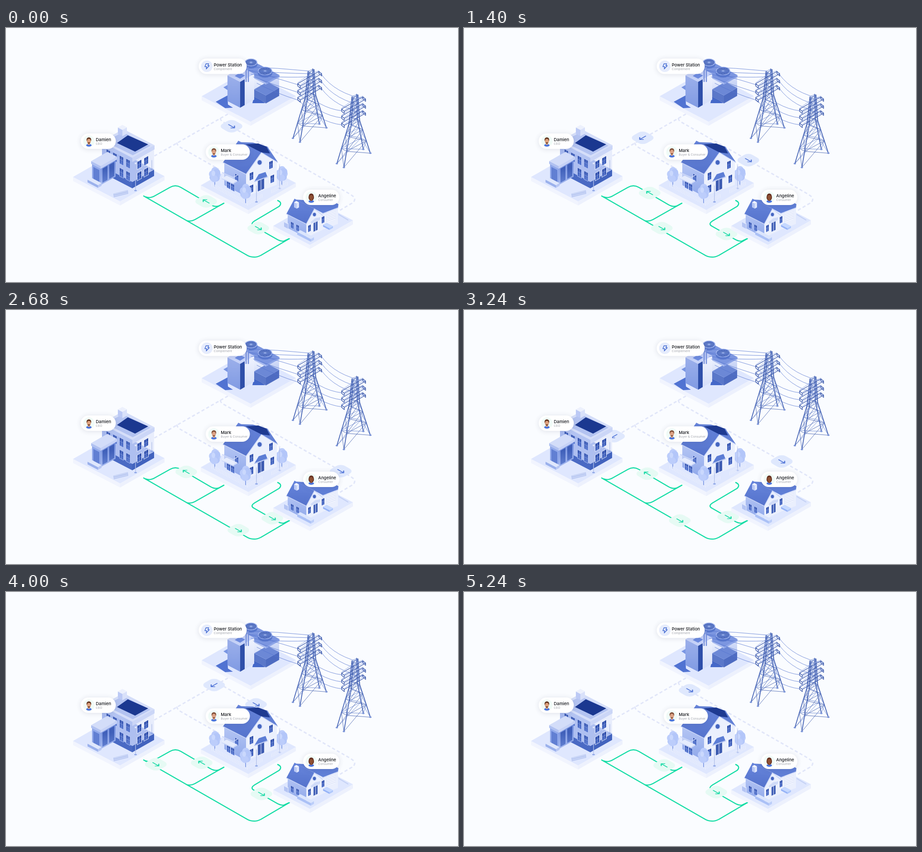
These frames come from a looping animation (998 by 561 pixels, 5320 ms). An HTML page with a canvas:

```html
<!DOCTYPE html>
<html lang="en">
<head>
<meta charset="utf-8">
<title>Local energy sharing</title>
<style>
html, body { margin: 0; width: 100%; height: 100%; overflow: hidden; background: #fafcff; }
canvas { display: block; width: 998px; height: 561px; }
</style>
</head>
<body>
<canvas id="stage" width="998" height="561"></canvas>
<script>
const W = 998, H = 561, LOOP = 5320, HALF = 2680;
const KL = .52, KR = -.57;   // slopes of left and right facing edges
const FONT = 'Inter, "Open Sans", sans-serif';
const stage = document.getElementById('stage').getContext('2d');
let c;

function layer(draw) {
  const cv = document.createElement('canvas');
  cv.width = W; cv.height = H;
  c = cv.getContext('2d');
  c.lineCap = c.lineJoin = 'round';
  draw();
  return cv;
}
function poly(pts, fill) {
  c.fillStyle = fill;
  c.fill(new Path2D('M' + pts.replace(/ /g, 'L') + 'Z'));
}
function path(d, color, width) {
  c.strokeStyle = color; c.lineWidth = width;
  c.stroke(new Path2D(d));
}
function oval(x, y, rx, ry, fill) {
  c.fillStyle = fill;
  c.beginPath(); c.ellipse(x, y, rx, ry, 0, 0, 7); c.fill();
}
function fade(y, h, a, b) {
  const g = c.createLinearGradient(0, y, 0, y + h);
  g.addColorStop(0, a); g.addColorStop(1, b);
  return g;
}
// Upright parallelogram: (x, y) is its top left corner, k its slope
function wall(x, y, w, h, k, fill) {
  poly(`${x},${y} ${x + w},${y + w * k} ${x + w},${y + w * k + h} ${x},${y + h}`, fill);
}
// Block standing on its front corner (x, y), a wide to the left, b to the right
function box(x, y, a, b, h, top, left, right) {
  const t = y - h;
  wall(x - a, t - a * KL, a, h, KL, left);
  wall(x, t, b, h, KR, right);
  poly(`${x},${t} ${x + b},${t + b * KR} ${x + b - a},${t + b * KR - a * KL} ${x - a},${t - a * KL}`, top);
}
const slab = (x, y, a, b) => box(x, y + 9, a, b, 9, '#dfe7fe', '#f1f4fe', '#edf1fd');

function win(x, y, w, h, k) {
  wall(x - .8, y - .8 - k * .8, w + 1.6, h + 1.6, k, k < 0 ? '#fff' : '#bac9f5');
  wall(x, y, w, h, k, fade(y, h, '#2f4eaa', '#4f70cb'));
  path(`M${x + w / 2} ${y + w * k / 2}v${h}M${x} ${y + h * .45}l${w} ${w * k}`, '#9db3ec', .6);
}

/* ---------- lines on the ground ---------- */
function ground() {
  c.fillStyle = '#fafcff';
  c.fillRect(0, 0, W, H);
  c.lineCap = 'butt';
  c.setLineDash([7, 5]);
  const pale = '#e1e6f9', green = '#14dda6';
  path('M490 190L320 287', pale, 3);
  path('M473 199Q474 205 480 208L758 366Q770 373 770 378Q770 384 762 388L735 404', pale, 3);
  path('M377 253Q378 259 384 263L470 312', pale, 3);
  c.setLineDash([]);
  c.lineCap = 'round';
  path('M304 371L529 500Q546 511 563 502L626 465', green, 2.5);
  path('M308 373Q317 377 328 371L362 352Q374 345 386 352L451 390Q461 396 470 393L481 387', green, 2.5);
  path('M481 387L421 421Q410 428 400 426', green, 2.5);
  path('M600 381Q611 386 603 394L549 426Q538 433 548 438L597 466Q605 471 613 471L626 465', green, 2.5);
}

/* ---------- power station and pylons ---------- */
function fan(x, y, rx, ry) {
  oval(x, y + 5, rx, ry, '#5877cc');
  c.fillRect(x - rx, y, rx * 2, 5);
  oval(x, y, rx, ry, '#a3b7ef');
  oval(x, y, rx - 2, ry - 1.5, '#506dbe');
  for (let a = 0; a < 6.2; a += Math.PI / 6)
    path(`M${x} ${y}l${Math.cos(a) * (rx - 3)} ${Math.sin(a) * (ry - 2.5)}`, '#7f97d8', .6);
  oval(x, y, 3, 2, '#91a8e4');
}
function station() {
  slab(540, 207, 108, 100);
  poly('463,163 489,149 490,169 501,176 484,177', '#5173d2');
  poly('480,131 489,126 489,137', '#7a96e3');
  poly('544,166 548,150 572,166', '#4468c9');
  box(574, 166, 26, 29, 44, '#9db2ec', fade(110, 50, '#eef2fd', '#c3d0f6'), fade(105, 50, '#dbe3fa', '#a6b9ee'));
  box(574, 166, 26, 29, 17, '#6c88d6', '#6683d2', '#5573c8');
  for (let y = 151; y < 167; y += 3) path(`M548 ${y - 26 * KL}L574 ${y}L603 ${y + 29 * KR}`, '#3b59b0', .8);
  box(574, 125, 65, 30, 4, '#7c96e0', '#a9bbef', '#8fa6e8');
  fan(541, 76, 14, 8.5);
  fan(572, 95, 16, 9.5);
  box(517, 176, 28, 31, 57, '#c6d2f8', fade(104, 70, '#9cb0eb', '#819be3'), fade(100, 70, '#f1f4fe', '#d5def9'));
  wall(517, 119, 10, 57, KR, '#2f4fa9');
  poly('505,106 516,99 528,105 517,112', '#6d8be0');
  for (const x of [530, 535]) {
    path(`M${x} 86v32`, '#6482d6', 2.6);
    path(`M${x - .8} 86v32`, '#b6c5f2', .8);
  }
}
function pylon() {
  const dark = '#3856a9', mid = '#6380cc', lite = '#91a8e2';
  // corners of the mast at height k (0 ground, 1 waist, 2 top)
  const ring = k => {
    const s = k < 1 ? 1 - k * .68 : .32 - (k - 1) * .14;
    const x = 670.5 + k * 1.5, y = k < 1 ? 232 - k * 80 : 152 - (k - 1) * 58;
    return [[-1, .31], [-.58, .54], [1, -.31], [.58, -.54]].map(p => [x + p[0] * 37 * s, y + p[1] * 37 * s]);
  };
  const bands = [0, .38, .72, 1, 1.27, 1.52, 1.77, 2].map(ring);
  bands.slice(1).forEach((hi, n) => {
    const lo = bands[n];
    for (let i = 0; i < 4; i++) {
      const j = (i + 1) % 4;
      path(`M${lo[i]}L${hi[j]}M${lo[j]}L${hi[i]}L${hi[j]}`, i < 2 ? dark : mid, .8);
      path(`M${lo[i]}L${hi[i]}`, dark, 1.8);
      path(`M${lo[i][0] - .6} ${lo[i][1]}L${hi[i][0] - .6} ${hi[i][1]}`, lite, .6);
    }
  });
  for (const f of bands[0]) oval(f[0], f[1], 2.8, 1.8, '#7c95d9');
  for (let y = 0; y < 32; y += 15.5) {
    path(`M644 ${123 + y}l47 -27l6 5l-47 27zv5l6 5v-5M691 ${96 + y}v5l6 5v-5`, dark, 1.3);
    path(`M644 ${121 + y}l24 -17l23 -10M650 ${126 + y}l24 -18l23 -9`, lite, .9);
  }
}
function wires() {
  const blue = '#5675d0';
  for (let i = 0; i < 3; i++) {
    const y = i * 15.5;
    path(`M${533 + i * 4} ${86 + i * 8}Q600 ${88 + i * 12} ${669 + i * 8} ${95 + i * 6}`, blue, .8);
    path(`M${538 + i * 8} ${94 + i * 14}Q595 ${110 + i * 17} 647 ${126 + i * 17}`, blue, .8);
    path(`M696 ${102 + y}Q727 ${145 + y} 793 ${157 + y}M648 ${130 + y}Q690 ${177 + y} 742 ${183 + y}`, blue, .8);
  }
}

/* ---------- houses ---------- */
function lamp(x, y0, y1) {
  path(`M${x} ${y0}V${y1}`, '#b3c1ea', 1.4);
  oval(x, y0, 2, 2, '#e5ebfc');
  oval(x, y1, 3, 1.6, '#8ea6e6');
}
function office() {
  slab(252, 383, 104, 98);
  box(279, 354, 67, 48, 65, '#aebff0', fade(255, 95, '#b0c1f2', '#819be5'), '#e8edfc');
  box(279, 354, 67, 48, 14, '#aebff0', '#4a6ac4', '#4263be');
  box(279, 296, 69, 49, 9, '#d5def9', '#b4c4f2', '#cbd6f7');
  poly('219,251 258,230 319,260 280,281', '#b3c3f1');
  poly('245,254 269,237 314,257 285,273', '#1b3890');
  box(257, 239, 10, 10, 14, '#edf1fd', '#bccaf5', '#d9e1fa');
  for (let i = 0; i < 4; i++) {
    win(222 + i * 14.5, 268 + i * 7, 8, 17, KL);
    if (i > 1) win(222 + i * 14.5, 295 + i * 7, 8, 18, KL);
    win(290 + i % 2 * 15, 296 - i % 2 * 8 + (i > 1 ? 25 : 0), 9, 16, KR);
  }
  // porch
  box(209, 347, 19, 33, 40, '#c0cef5', '#90a8ea', fade(290, 55, '#6d8adb', '#a3b7ee'));
  wall(193, 307, 13, 28, KL, '#617fd3');
  for (const x of [213, 228]) wall(x, 313 - (x - 209) * .57, 11, 31, KR, fade(310, 34, '#3f5fb9', '#6381d2'));
  box(209, 311, 21, 36, 6, '#d3ddf9', '#b0c1f1', '#c6d2f6');
  // street furniture
  box(203, 353, 23, 8, 6, '#dfe7fc', '#9bb1ec', '#b9c8f4');
  poly('237,366 269,358 270,366 238,374', '#b9c8f2');
  path('M239 367L268 360M239 371L268 364', '#dbe3fa', 1);
  lamp(286, 299, 359);
  lamp(322, 290, 312);
}
function tree(x, y) {
  path(`M${x} ${y}v24`, '#8ba4e8', 2);
  for (let i = 0; i < 7; i++) {
    const a = i * 2.4;
    oval(x + Math.cos(a) * 5, y - 1 + Math.sin(a) * 9, 8, 8, i % 2 ? '#b3c6f9' : '#bccdfb');
  }
  oval(x - 3, y - 4, 4, 6, '#cad8fd');
}
function fence(x0, y0, x1, y1) {
  const dx = x1 - x0, dy = y1 - y0, n = Math.round(dx / 3.2);
  path(`M${x0} ${y0 - 2}l${dx} ${dy}M${x0} ${y0 - 5}l${dx} ${dy}`, '#d0daf8', .8);
  for (let i = 0; i <= n; i++) path(`M${x0 + dx * i / n} ${y0 + dy * i / n}v-7`, '#eef2fe', 1.2);
}
// House with a gable on its right side, front corner at (x, y)
function gabled(x, y, a, b, h, k, rise) {
  const e = y - h, ax = x + b / 2, ay = e + b / 2 * k - rise;
  wall(x - a, e - a * KL, a, h, KL, fade(e - 20, h + 20, '#b3c4f3', '#8ea7ea'));
  poly(`${x},${y} ${x},${e} ${ax},${ay} ${x + b},${e + b * k} ${x + b},${y + b * k}`, '#ebf0fd');
  poly(`${ax},${ay} ${x},${e + 1} ${x - a - 3},${e - a * KL} ${ax - a - 3},${ay - a * KL - 1}`,
    fade(ay - a * KL, e - ay + a * KL, '#6684db', '#5573cc'));
  path(`M${x - a - 3} ${e - a * KL}L${x} ${e + 1}L${ax} ${ay}L${x + b + 2} ${e + b * k + 1}`, '#cad6f8', 1.5);
}
function roundWindow(x, y, r) {
  oval(x, y, r + 1.5, r + 1.7, '#c9d5f7');
  oval(x, y, r, r + .4, '#4566c1');
}
function villa() {
  slab(535, 402, 105, 105);
  tree(461, 325);
  tree(609, 323);
  poly('512,252 545,253 577,262 600,296 564,277', '#6381d5');
  poly('529,257 557,255 575,262 583,277 564,275', '#1e3a91');
  gabled(530, 372, 48, 68, 50, -.38, 34);
  roundWindow(560, 297, 4.5);
  for (const [x, y] of [[538, 321], [581, 296], [538, 349], [584, 327]]) win(x, y, 8, 16, -.45);
  wall(556, 338, 14, 23, -.45, '#3f5db2');
  path('M563 335v23', '#d7e0f9', 1.2);
  poly('549,338 558,323 573,318 577,328', '#5c7dd5');
  path('M549 339L577 329', '#b6c6f2', 2);
  for (let i = 0; i < 3; i++) win(488 + i * 9, 338 + i * 5 - (i > 1 ? 26 : 0), 7, 14, KL);
  // balcony
  poly('477,332 487,326 511,337 501,343', '#e2e9fc');
  for (let i = 0; i < 9; i++) path(`M${478 + i * 3} ${319 + i * 1.3}v13`, '#eef2fe', 1);
  path('M477 319L501 330L511 325M477 333L501 344L511 338', '#cdd8f8', 1.5);
  lamp(604, 302, 354);
  fence(587, 364, 621, 347);
  fence(455, 350, 533, 391);
  fence(533, 391, 565, 374);
  tree(529, 362);
  lamp(553, 346, 384);
}
function cottage() {
  slab(671, 479, 81, 95);
  wall(698, 404, 35, 42, -.38, '#eaeffd');
  poly('640,379 724,384 734,389 733,397 700,409 683,400', '#5f7ed6');
  gabled(663, 463, 41, 36, 31, -.48, 24);
  path('M699 410L733 397', '#c4d1f7', 1.4);
  box(642, 399, 6, 5, 11, '#f0f4ff', '#bac8f4', '#dde5fb');
  roundWindow(681, 412, 3.3);
  win(629, 428, 6, 13, KL);
  win(641, 434, 6, 13, KL);
  win(667, 437, 6, 14, -.48);
  win(697, 418, 6, 14, -.45);
  wall(679, 431, 9, 19, -.48, '#4462b7');
  path('M683.5 429v19', '#d4def9', 1);
  poly('673,428 683,420 694,418 693,424 674,432', '#d0dbf8');
  wall(708, 407, 19, 22, -.38, '#f7f9ff');
  for (let y = 409; y < 428; y += 3.6) path(`M708 ${y}l19 -7.2`, '#c2cff4', .9);
  // hedges, pool and low walls
  box(673, 472, 30, 7, 6, '#dbe5fd', '#abc1f6', '#bccef9');
  box(714, 446, 14, 8, 4, '#c5d8ff', '#97b4f7', '#aec7fb');
  box(622, 443, 8, 2, 10, '#dfe7fc', '#b4c4f3', '#c9d5f7');
  path('M735 412L755 424', '#c5d2f5', 2.2);
}

/* ---------- labels ---------- */
function label(x, y, w, title, sub) {
  c.save();
  c.shadowColor = 'rgba(50,60,95,.14)';
  c.shadowBlur = 12; c.shadowOffsetY = 1;
  c.fillStyle = '#fff';
  c.beginPath(); c.roundRect(x, y, w, 34, 17); c.fill();
  c.restore();
  c.fillStyle = '#15171c';
  c.font = '500 9.4px ' + FONT;
  c.fillText(title, x + 33.3, y + 17);
  c.fillStyle = '#a2a5ad';
  c.font = '400 6.7px ' + FONT;
  c.fillText(sub, x + 33.3, y + 25.3);
}
function avatar(x, y, skin, hair, long) {
  oval(x, y, 12.7, 12.7, '#f0fbf7');
  if (long) oval(x, y, 6, 7.5, hair);
  oval(x, y + 9, 6, 3, '#4b74dc');
  c.fillStyle = skin; c.fillRect(x - 2, y + 3, 4, 5);
  oval(x, y - 3, 5.2, 5.6, hair);
  oval(x, y, 4.4, 5.2, skin);
  if (!long) oval(x, y + 4, 2.8, 1.3, hair);
}
function labels() {
  label(425.5, 67.5, 106, 'Power Station', 'Complement');
  oval(443.5, 84.5, 12.7, 12.7, '#e6ecfc');
  path('M441.5 79h6l-1.8 4.2h3.2l-6.8 7.3l1 -5h-4z', '#4068d0', 1.4);
  label(165, 233, 77.5, 'Damien', 'CEO');
  avatar(183, 250, '#dda17e', '#633620');
  label(441, 257, 97.5, 'Mark', 'Buyer & Consumer');
  avatar(459, 274, '#dca285', '#805039');
  label(656, 357, 80, 'Angeline', 'Consumer');
  avatar(674, 374, '#8e5033', '#642f1f', true);
}

/* ---------- moving arrows ---------- */
// Bezier easing with level ends; x1 and x2 place the handles in time
function ease(p, x1, x2) {
  p = Math.min(1, Math.max(0, p));
  let lo = 0, hi = 1, s;
  for (let i = 0; i < 24; i++) {
    s = (lo + hi) / 2;
    const x = 3 * s * (1 - s) * ((1 - s) * x1 + s * x2) + s ** 3;
    if (x < p) lo = s; else hi = s;
  }
  return s * s * (3 - 2 * s);
}
const BLUE = ['#dfe8fd', '#5578d8'], GREEN = ['#e6faf4', '#1fdba8'];
// start, horizontal travel, side of slope, quarter turns, easing handles
const chips = [
  { x: 498, y: 217, run: 241, k: .577, turn: 0, tint: BLUE, out: [.42, .58] },
  { x: 506, y: 179, run: -207, k: -.57, turn: 1, tint: BLUE, out: [.42, .58] },
  { x: 278, y: 350, run: 235, k: .58, turn: 0, tint: GREEN, out: [.44, .38] },
  { x: 442, y: 383, run: -44, k: .577, turn: 2, tint: GREEN, out: [.4, .33] },
  { x: 557, y: 442, run: 31, k: .577, turn: 0, tint: GREEN, out: [.4, .33] }
];
function drawChip(g, chip, t) {
  const there = t < HALF ? ease(t / HALF, ...chip.out)
    : 1 - ease((t - HALF) / (LOOP - HALF), .4, .2);
  const dx = chip.run * there;
  g.save();
  g.translate(chip.x + dx, chip.y + dx * chip.k);
  g.transform(.866, .5, -.866, .5, 0, 0);
  g.fillStyle = chip.tint[0];
  g.beginPath(); g.roundRect(-17, -17, 34, 34, 11); g.fill();
  g.rotate(chip.turn * Math.PI / 2);
  g.strokeStyle = chip.tint[1];
  g.lineWidth = 2; g.lineCap = g.lineJoin = 'round';
  g.stroke(new Path2D('M-7.5 0H7.5M3 -4.5L7.5 0L3 4.5'));
  g.restore();
}

const back = layer(ground);
const front = layer(() => {
  station();
  wires();
  pylon();
  c.translate(97, 56);
  pylon();
  c.translate(-97, -56);
  office();
  villa();
  cottage();
  labels();
});

function frame() {
  const t = Math.floor(performance.now() % LOOP / 40) * 40;
  stage.drawImage(back, 0, 0);
  for (const chip of chips) drawChip(stage, chip, t);
  stage.drawImage(front, 0, 0);
  requestAnimationFrame(frame);
}
frame();
</script>
</body>
</html>
```
